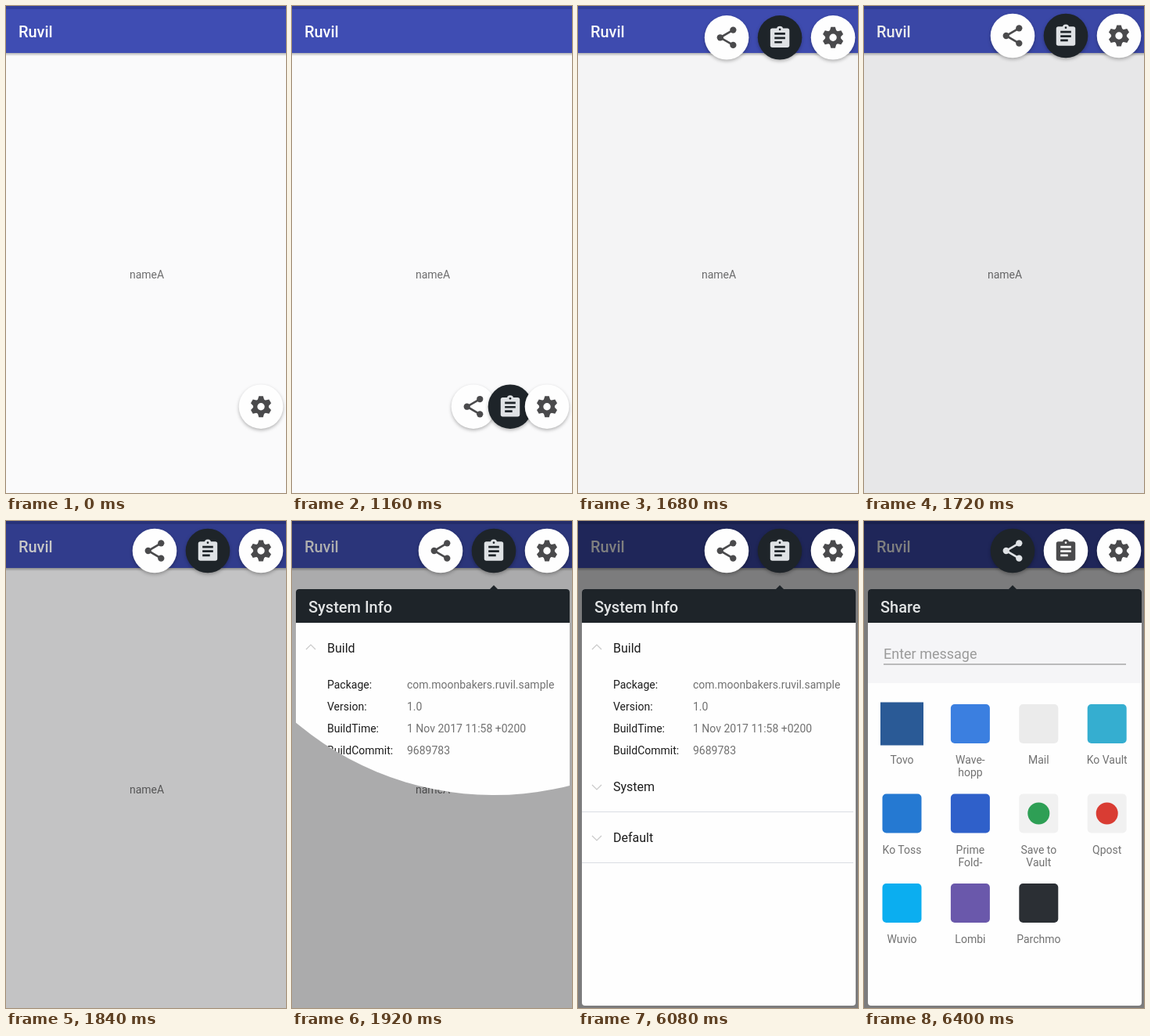
These frames come from a looping animation (358x622 px, 8000 ms). An HTML page:

```html
<!DOCTYPE html>
<html lang="en">
<head>
<meta charset="utf-8">
<title>Debug overlay</title>
<style>
  html, body { margin: 0; width: 100%; height: 100%; overflow: hidden; background: #fafafb; }
  svg { display: block; width: 358px; height: 622px; font-family: Roboto, sans-serif; font-size: 14px; }
  .title { font-size: 20px; font-weight: 500; }
  .section { font-size: 16px; }
  .button { filter: drop-shadow(0 2px 2px rgba(0, 0, 0, .28)); }
</style>
</head>
<body>
<svg viewBox="0 0 358 622">
  <defs>
    <clipPath id="infoClip"><circle id="infoReveal" cx="258" cy="-42"/></clipPath>
    <clipPath id="shareClip"><circle id="shareReveal" cx="190" cy="-42"/></clipPath>
    <linearGradient id="barShadow" x2="0" y2="1">
      <stop stop-color="#000" stop-opacity=".28"/>
      <stop offset="1" stop-color="#000" stop-opacity="0"/>
    </linearGradient>
  </defs>

  <rect width="358" height="622" fill="#fafafb"/>
  <rect y="60" width="358" height="4" fill="url(#barShadow)"/>
  <rect width="358" height="60" fill="#3f4db3"/>
  <rect width="358" height="4" fill="#33409b"/>
  <text class="title" x="16" y="40" fill="#fff">Ruvil</text>
  <text x="180" y="348" text-anchor="middle" fill="#6d6d6e">nameA</text>
  <rect id="dim" width="358" height="622" opacity="0"/>

  <g id="info" clip-path="url(#infoClip)"></g>
  <g id="share" clip-path="url(#shareClip)"></g>

  <g id="shareButton" class="button">
    <circle class="face" r="28.3"/>
    <g class="ink" transform="scale(1.38) translate(-12 -12)">
      <path d="M18 5L6 12L18 19" fill="none" stroke="currentColor" stroke-width="1.9"/>
      <g fill="currentColor">
        <circle cx="18" cy="5" r="3"/><circle cx="6" cy="12" r="3"/><circle cx="18" cy="19" r="3"/>
      </g>
    </g>
  </g>
  <g id="infoButton" class="button">
    <circle class="face" r="28.3"/>
    <g class="ink" transform="scale(1.36) translate(-12 -11.6)">
      <rect x="3" y="3" width="18" height="18" rx="2" fill="currentColor"/>
      <circle cx="12" cy="4" r="3" fill="currentColor"/>
      <circle class="face" cx="12" cy="4" r="1"/>
      <path class="lines" d="M7 8H17M7 12H17M7 16H14" stroke-width="2"/>
    </g>
  </g>
  <g id="gearButton" class="button">
    <circle class="face" r="28.3"/>
    <g id="gear" class="ink" transform="scale(1.36)">
      <circle r="5.4" fill="none" stroke="currentColor" stroke-width="3.9"/>
    </g>
  </g>
</svg>

<script>
const LOOP = 8000, STEP = 40, DARK = '#1e2429';
const $ = id => document.getElementById(id);
const clamp = v => Math.max(0, Math.min(1, v));
const progress = (t, start, duration) => clamp((t - start) / duration);
const easeInOut = p => (1 - Math.cos(Math.PI * p)) / 2;
const easeOut = p => 1 - (1 - p) ** 2;

const text = (x, y, fill, content, extra = '') =>
  `<text x="${x}" y="${y}" fill="${fill}" ${extra}>${content}</text>`;

const panel = (title, arrowX, content) => `
  <path d="M${arrowX - 6} 88l6 -6l6 6z" fill="${DARK}"/>
  <rect x="5" y="87" width="350" height="532" rx="4" fill="#fefefe"/>
  <path d="M5 130V91a4 4 0 0 1 4-4H351a4 4 0 0 1 4 4V130z" fill="${DARK}"/>
  ${text(21, 117, '#e2e4e5', title, 'class="title"')}${content}`;

// System info page
const section = (y, name, open) =>
  `<path d="M18 ${y + (open ? 2 : -2)}l6 ${open ? -6 : 6}l6 ${open ? 6 : -6}" fill="none" stroke="#c9c9c9" stroke-width="1.2"/>`
  + text(45, y + 6, '#1d1d1d', name, 'class="section"');
const divider = y => `<path d="M5 ${y}H352" stroke="#dadde3"/>`;
const rows = [
  ['Package:', 'com.moonbakers.ruvil.sample'],
  ['Version:', '1.0'],
  ['BuildTime:', '1 Nov 2017 11:58 +0200'],
  ['BuildCommit:', '9689783']
];
$('info').innerHTML = panel('System Info', 258,
  section(162, 'Build', true)
  + rows.map(([key, value], i) =>
      text(45, 214 + 28 * i, '#1d1d1d', key) + text(147, 214 + 28 * i, '#717171', value)).join('')
  + section(339, 'System') + divider(371.5)
  + section(404, 'Default') + divider(436.5));

// Share page: label lines, tile colour, optional spot colour
const apps = [
  [['Tovo'], '#2a5a96'], [['Wave-', 'hopp'], '#3b7fe0'],
  [['Mail'], '#ebebeb'], [['Ko Vault'], '#35aed0'],
  [['Ko Toss'], '#2579d2'], [['Prime', 'Fold-'], '#2f60ca'],
  [['Save to', 'Vault'], '#f1f1f1', '#2e9f55'], [['Qpost'], '#f1f1f1', '#d93c33'],
  [['Wuvio'], '#0baef0'], [['Lombi'], '#6a58ab'], [['Parchmo'], '#2b2f34']
];
const appCell = ([lines, tile, spot], i) => {
  const x = 48.5 + 87.4 * (i % 4), row = Math.floor(i / 4), y = 259 + 114.5 * row;
  const half = i ? 25 : 27.5;
  return `<rect x="${x - half}" y="${y - half}" width="${2 * half}" height="${2 * half}" rx="${i ? 5 : 0}" fill="${tile}"/>`
    + (spot ? `<circle cx="${x}" cy="${y}" r="14" fill="${spot}"/>` : '')
    + lines.map((line, n) => text(x, y + 51 + 16 * n, '#727272', line, 'text-anchor="middle"')).join('');
};
$('share').innerHTML = panel('Share', 190,
  '<rect x="5" y="130" width="350" height="77" fill="#f5f5f7"/>'
  + text(25, 176, '#9b9b9b', 'Enter message', 'font-size="18"')
  + '<path d="M25 183H335" stroke="#808080"/>'
  + apps.map(appCell).join(''));

for (let angle = 0; angle < 360; angle += 60) {
  $('gear').insertAdjacentHTML('beforeend',
    `<path d="M-3.2 -6L-2 -9.9H2L3.2 -6z" transform="rotate(${angle})" fill="currentColor"/>`);
}

function setButton(id, x, y, selected) {
  const button = $(id), face = selected ? DARK : '#fefefe';
  button.setAttribute('transform', `translate(${x} ${y})`);
  button.querySelectorAll('.face').forEach(el => el.setAttribute('fill', face));
  button.querySelectorAll('.lines').forEach(el => el.setAttribute('stroke', face));
  button.querySelector('.ink').setAttribute('color', selected ? '#dfe2e5' : '#4a4a4c');
}

function draw(t) {
  const spread = 68 * easeOut(progress(t, 1000, 360));
  const rise = easeInOut(progress(t, 1247, 453));
  const x = 326 + 5.7 * Math.sin(Math.PI * rise);
  const y = 511.7 - 473.7 * rise;
  const sharing = t >= 6120;

  setButton('gearButton', x, y, false);
  setButton('infoButton', x - spread, y, !sharing);
  setButton('shareButton', x - 2 * spread, y, sharing);
  for (const id of ['infoButton', 'shareButton'])
    $(id).setAttribute('visibility', t > 1000 ? 'visible' : 'hidden');

  $('dim').setAttribute('opacity', 0.5 * progress(t, 1660, 410));
  $('infoReveal').setAttribute('r', sharing ? 0 : 710 * easeInOut(progress(t, 1760, 300)));
  $('shareReveal').setAttribute('r', 710 * easeInOut(progress(t, 6090, 300)));
}

function frame() {
  const t = performance.now() % LOOP;
  draw(t - t % STEP);
  requestAnimationFrame(frame);
}
frame();
</script>
</body>
</html>
```
